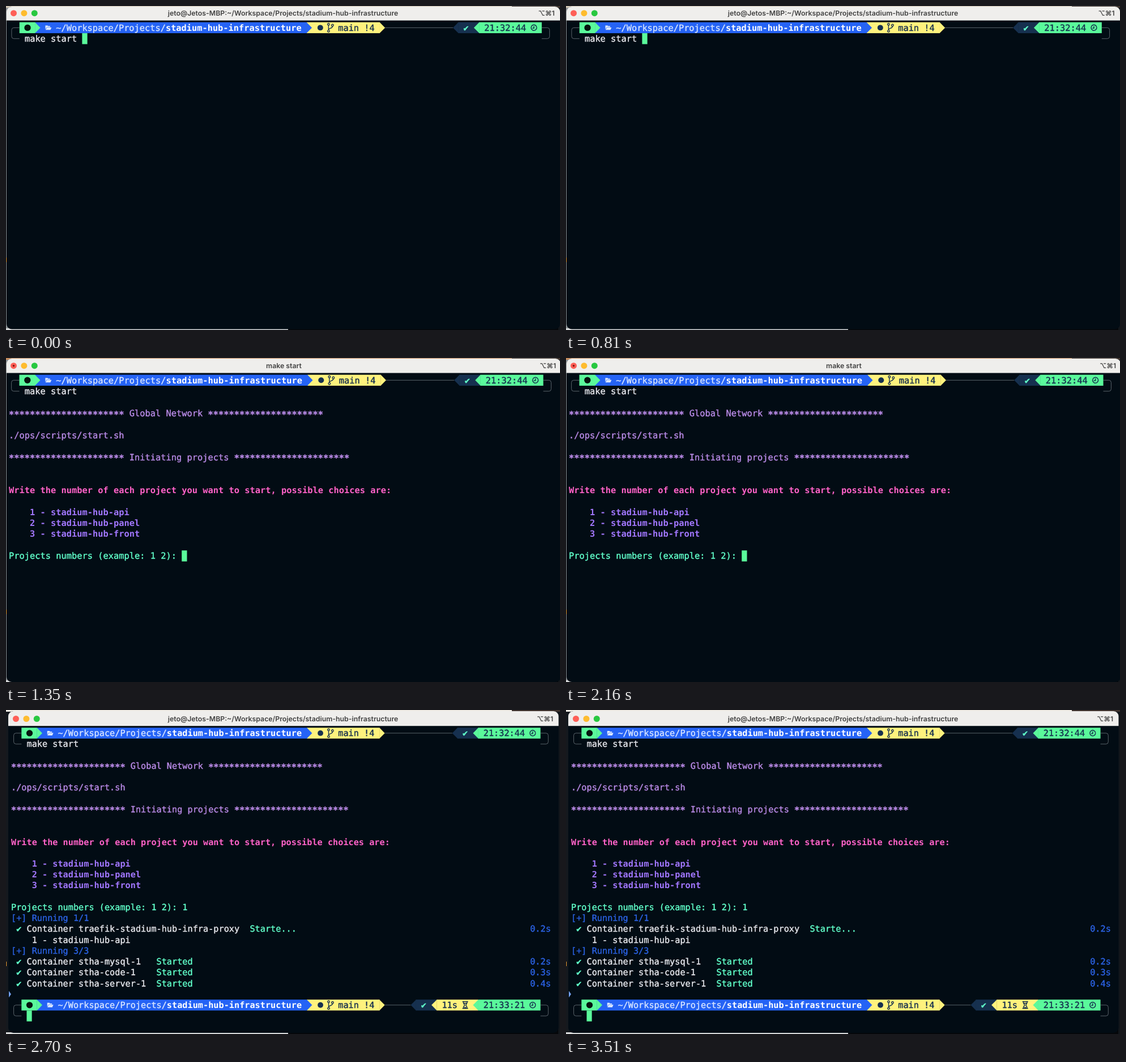
An HTML page with a canvas for the animation above (4050 ms loop, 978 px wide and 573 px high).

```html
<!DOCTYPE html>
<html lang="en">
<head>
<meta charset="utf-8">
<title>Terminal session</title>
<style>
  html, body { margin: 0; overflow: hidden; background: #020c14; }
  canvas { display: block; }
</style>
</head>
<body>
<canvas id="stage" width="978" height="573"></canvas>
<script>
const ctx = document.getElementById('stage').getContext('2d');
const CELL = 9.25, ROW = 19.42, SCENE_MS = 1350;
const GREEN = '#5af99b', BLUE = '#2563f5', YELLOW = '#fff27d', NAVY = '#16304f';
const PURPLE = '#b98ae6', VIOLET = '#a277ff', PINK = '#ff62c8', AQUA = '#61ffca';
const WHITE = '#e9e9ee', LINK = '#2b62e3', RULE = '#5b646b', INK = '#06150f';
const PATH_TITLE = 'jeto@Jetos-MBP:~/Workspace/Projects/stadium-hub-infrastructure';

// Window placement and the origin and scale of the character grid
const scenes = [
  { left: 1, top: 1, right: 978, bottom: 571.5, light: [13.5, 12.7], title: PATH_TITLE,
    grid: [5.3, 28.7, 0.9968], edge: '#cfc3b2', side: '#8b8f92', draw: ready },
  { left: 1, top: 1, right: 979, bottom: 573, light: [13.5, 13.7], title: 'make start', busy: true,
    grid: [5, 29.6, 1], edge: '#c58a5c', side: '#8b8f92', draw: asking },
  { left: 4, top: 2, right: 975.5, bottom: 571, light: [17.5, 15.5], title: PATH_TITLE,
    grid: [9, 31.3, 0.9905], edge: '#efebe4', side: '#15191e', draw: finished }
];

function box(x, y, w, h, color) {
  ctx.fillStyle = color;
  ctx.fillRect(x, y, w, h);
}

function disc(x, y, r, color) {
  ctx.fillStyle = color;
  ctx.beginPath();
  ctx.arc(x, y, r, 0, 7);
  ctx.fill();
}

function shape(d, color, x, y, lineWidth) {
  ctx.save();
  ctx.translate(x, y);
  ctx.fillStyle = ctx.strokeStyle = color;
  ctx.lineWidth = lineWidth || 1;
  lineWidth ? ctx.stroke(new Path2D(d)) : ctx.fill(new Path2D(d));
  ctx.restore();
}

function fillCells(row, from, to, color) {
  box(from * CELL, row * ROW, (to - from) * CELL, ROW, color);
}

// A hairline stroke thickens the regular weight; asterisks sit at mid-height
function print(row, col, text, color, bold) {
  ctx.textAlign = 'left';
  ctx.fillStyle = ctx.strokeStyle = color;
  ctx.lineWidth = 0.4;
  [...text].forEach((char, i) => {
    if (char === ' ') return;
    const star = char === '*', x = (col + i) * CELL, y = row * ROW + 15 + (star ? 1.7 : 0);
    ctx.font = `${bold || star ? 'bold ' : ''}15.36px "DejaVu Sans Mono", monospace`;
    ctx.fillText(char, x, y);
    if (!bold) ctx.strokeText(char, x, y);
  });
}

function arrow(row, col, color, toLeft) {
  const base = toLeft ? CELL + 0.3 : -0.3, tip = toLeft ? 0 : CELL;
  shape(`M${base} 0L${tip} ${ROW / 2}L${base} ${ROW}Z`, color, col * CELL, row * ROW);
}

// Icons are centred on their cell
function icon(row, col, d, color, lineWidth) {
  shape(d, color, (col + 0.5) * CELL, (row + 0.5) * ROW, lineWidth);
}

function prompt(row, time, took) {
  const mid = (row + 0.5) * ROW, status = took ? 77 : 85;
  const x = CELL / 2, far = 103.5 * CELL;
  shape(`M${2 * CELL} 0H${x + 4}Q${x} 0 ${x} 4V${ROW - 4}Q${x} ${ROW} ${x + 4} ${ROW}H${2 * CELL}
    M${102 * CELL} 0H${far - 4}Q${far} 0 ${far} 4V${ROW - 4}Q${far} ${ROW} ${far - 4} ${ROW}H${102 * CELL}
    M${72 * CELL} 0H${status * CELL}`, RULE, 0, mid, 1);

  fillCells(row, 2, 5, GREEN);
  fillCells(row, 5, 57, BLUE);
  fillCells(row, 57, 71, YELLOW);
  arrow(row, 5, GREEN);
  arrow(row, 57, BLUE);
  arrow(row, 71, YELLOW);
  disc(3.55 * CELL, mid, 5.7, INK);
  icon(row, 7, 'M-5 3V-4H-1L0-2.8H3.5V-1H-2.5Z M-4.7 4L-2.2-.5H6L4 4Z', '#dce8ff');
  print(row, 9, '~/Workspace/Projects/', '#d5e3ff');
  print(row, 30, 'stadium-hub-infrastructure', '#ffffff', true);
  disc(59.6 * CELL, mid, 5, NAVY);
  icon(row, 61, 'M-3-4V4M4-2.5C4 2-3 0-3 4M-1.2-6A1.8 1.8 0 1 1-1.2-6.1M-1.2 6A1.8 1.8 0 1 1-1.2 5.9M5.8-4.3A1.8 1.8 0 1 1 5.8-4.4',
    NAVY, 1.4);
  print(row, 63, 'main !4', NAVY);

  arrow(row, status, NAVY, true);
  fillCells(row, status + 1, took ? 82 : 90, NAVY);
  print(row, status + 2, '✔', AQUA);
  if (took) {
    arrow(row, 81, YELLOW, true);
    fillCells(row, 82, 90, YELLOW);
    print(row, 83, took, NAVY);
    icon(row, 87, 'M-5-6H5M-5 6H5M-3.5-6C-3.5-2-1-1-1 0S-3.5 2-3.5 6M3.5-6C3.5-2 1-1 1 0S3.5 2 3.5 6M-2 4.5H2M-2-3H2', NAVY, 1.5);
  }
  arrow(row, 89, GREEN, true);
  fillCells(row, 90, 102, GREEN);
  print(row, 91, time, NAVY);
  icon(row, 100, 'M5 0A5 5 0 1 1 5-.1M0-3V.8H-2.7', NAVY, 1.5);
}

function cursor(row, col) {
  fillCells(row, col, col + 1, GREEN);
}

function command() {
  prompt(0, '21:32:44');
  print(1, 3, 'make start', WHITE);
}

function ready() {
  command();
  cursor(1, 14);
}

function menu() {
  const stars = '*'.repeat(22);
  command();
  print(3, 0, `${stars} Global Network ${stars}`, PURPLE);
  print(5, 0, './ops/scripts/start.sh', PURPLE);
  print(7, 0, `${stars} Initiating projects ${stars}`, PURPLE);
  print(10, 0, 'Write the number of each project you want to start, possible choices are:', PINK, true);
  ['api', 'panel', 'front'].forEach((name, i) =>
    print(12 + i, 4, `${i + 1} - stadium-hub-${name}`, VIOLET, true));
  print(16, 0, 'Projects numbers (example: 1 2):', AQUA);
}

function asking() {
  menu();
  cursor(16, 33);
}

function container(row, name, col, state, time) {
  print(row, 1, '✔', AQUA);
  print(row, 3, 'Container ' + name, WHITE);
  print(row, col, state, AQUA);
  print(row, 100, time, LINK);
}

function finished() {
  menu();
  print(16, 33, '1', AQUA);
  print(17, 0, '[+] Running 1/1', LINK);
  container(18, 'traefik-stadium-hub-infra-proxy', 46, 'Starte...', '0.2s');
  print(19, 4, '1 - stadium-hub-api', WHITE);
  print(20, 0, '[+] Running 3/3', LINK);
  container(21, 'stha-mysql-1', 28, 'Started', '0.2s');
  container(22, 'stha-code-1', 28, 'Started', '0.3s');
  container(23, 'stha-server-1', 28, 'Started', '0.4s');
  shape('M-4-6L0 0L-4 6Z', '#78a5f5', 0, 24.5 * ROW);
  prompt(25, '21:33:21', '11s');
  cursor(26, 3);
}

function desktop(s) {
  box(0, 0, 978, 573, s.side);
  box(0, 0, 978, 3, s.edge);
  box(893, 0, 85, 3, '#41352f');
  box(0, 570, 498, 3, '#d8d9da');
  box(498, 560, 480, 13, '#05070a');
  box(975, 3, 3, 570, '#11161b');
  box(0, 445, 1, 8, '#e59a2f');
}

function render(s) {
  const [left, top, scale] = s.grid, [x, y] = s.light;
  ctx.textRendering = 'geometricPrecision';
  desktop(s);
  ctx.save();
  ctx.beginPath();
  ctx.roundRect(s.left, s.top, s.right - s.left, s.bottom - s.top, 9);
  ctx.clip();
  box(0, 0, 978, 573, '#020c14');
  box(0, 0, 978, top - 3.1, '#efeeec');

  ['#fe5f57', '#febc2e', '#28c840'].forEach((color, i) => disc(x + i * 18.4, y, 5.5, color));
  if (s.busy) disc(x, y, 1.8, '#7d1712');
  ctx.fillStyle = '#414141';
  ctx.font = '600 12.3px Inter, sans-serif';
  ctx.textAlign = 'center';
  ctx.fillText(s.title, s.busy ? 490.5 : 489, y + 4.2);
  ctx.font = '600 12px Inter, "DejaVu Sans", sans-serif';
  ctx.textAlign = 'right';
  ctx.fillText('⌥⌘1', s.left === 4 ? 966 : s.busy ? 971 : 968.5, y + 4);

  ctx.translate(left, top);
  ctx.scale(scale, scale);
  s.draw();
  ctx.restore();
}

function tick() {
  render(scenes[Math.floor(performance.now() / SCENE_MS) % scenes.length]);
  requestAnimationFrame(tick);
}
tick();
</script>
</body>
</html>
```
